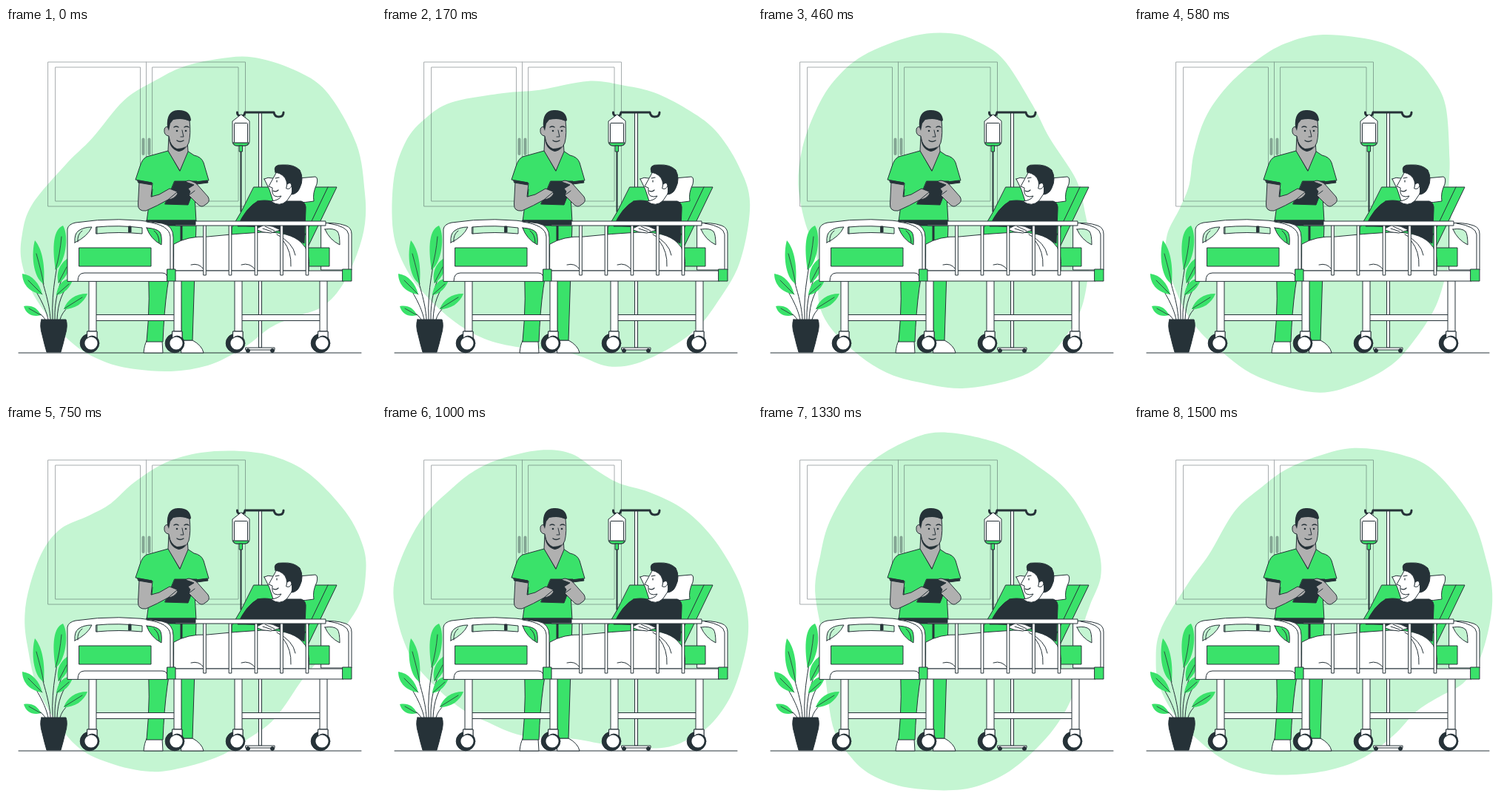
Recreate the animation shown at these times as an HTML page. Size 500x500 px, loop 1540 ms.

```html
<!DOCTYPE html>
<html lang="en">
<head>
<meta charset="utf-8">
<title>Hospital visit</title>
<style>
  html, body { margin: 0; width: 100%; height: 100%; overflow: hidden; background: #fff; }
  svg { display: block; width: 100vw; height: 100vh; }
  .scene { fill: none; stroke: #263238; stroke-width: 1; stroke-linecap: round; stroke-linejoin: round; }
  .green { fill: #3ae26a; }
  .white { fill: #fff; }
  .skin { fill: #b0b0b0; }
  .dark { fill: #263238; }
  .flat { stroke: none; }
  .cabinet { opacity: .4; }
  .leaf { fill: #3ae26a; stroke: none; }
</style>
</head>
<body>
<svg viewBox="0 0 500 500">
  <defs>
    <g id="leg">
      <path class="white" d="M-5 342V410H5V342ZM-7 410H6V422H-7Z"/>
      <circle class="dark" cx="-4" cy="426" r="12.800"/>
      <circle class="white flat" cx="-2" cy="426" r="8.600"/>
      <path class="white" d="M-7 410H6V419Q-1 413-7 419Z"/>
    </g>
    <path id="bar" class="white" d="M-1.800 267V334H1.800V267"/>
  </defs>

  <path id="blob" fill="#c4f5d2"/>

  <g class="scene">
    <g class="cabinet">
      <path d="M57 46H323.500V241H57ZM67 53H181.500V234H67ZM198 53H314V234H198ZM189.500 46V241"/>
      <path stroke-width="4" d="M185.500 150.500V170M193.500 150.500V170"/>
    </g>
    <path d="M17 439H480"/>

    <g id="plant">
      <path d="M60 394C59 370 50 348 41 312M63 394C61 350 70 325 75 282M66 394C65 368 72 345 82 323M57 394C54 380 47 365 30 339M69 394C70 372 76 355 87 345M73 394C76 381 91 370 103 364M53 394C48 386 40 381 31 379"/>
      <path class="leaf" d="M77 267C64 272 62 295 67 327C80 318 86 282 77 267ZM39 287C34 304 36 337 51 346C53 324 50 300 39 287ZM88 308C73 317 67 329 71 345C82 338 88 324 88 308ZM22 332C22 348 34 358 49 360C45 345 36 334 22 332ZM91 338C77 338 70 347 68 361C79 359 87 351 91 338ZM110 359C93 359 83 367 78 380C93 380 105 372 110 359ZM24 376C27 387 37 391 47 388C43 378 34 374 24 376Z"/>
      <path stroke-width=".8" d="M75 282Q73 306 67 326M41 305Q48 330 51 346M82 323L71 344M30 341L49 360M85 346L69 360M103 364L79 379M31 379L47 388"/>
      <path class="dark" d="M48 394H81Q84 402 80 415Q77 428 74 438H55Q52 428 49 415Q45 402 48 394Z"/>
    </g>

    <g id="drip">
      <path class="white" d="M341.500 114V432H345.500V114Z"/>
      <path stroke-width="3" d="M323 114H362Q363 120 368.500 120Q375 120 375 114M323 114Q322 120 317 119Q312 118 312.500 114"/>
      <path class="white" d="M317.500 117L306 126V153Q306 159 312 159H323Q329 159 329 153V126Z"/>
      <path class="green" d="M307 155H328Q327 159 323 159H312Q308 159 307 155Z"/>
      <rect class="white" x="308.500" y="128.500" width="18" height="26.500" rx="1"/>
      <path stroke-width="2" d="M317.500 167V248"/>
      <path class="green" d="M315.500 159H319.500V167H315.500Z"/>
      <path class="white" d="M324 432H363V435H324Z"/>
      <circle class="dark" cx="327" cy="436" r="2.500"/><circle class="dark" cx="360" cy="436" r="2.500"/>
    </g>

    <g id="nurse">
      <path class="white" d="M190 423H211L212 439H186Q187 428 190 423ZM237 422H252Q265 429 267 439H237Z"/>
      <path class="green" d="M191 266H257L252 422H237L236 290L230 295Q215 343 212 424H190Q196 365 191 310Z"/>
      <path class="green" d="M219 166L190 174Q184 177 181 187L175 205L197 209L190 262H257L254 209L274 206L267 182Q264 174 254 172L245 166L235 193Z"/>
      <path class="skin" d="M220 146L219 166L235 193L246 167L245 152Z"/>
      <path class="skin" d="M220 125Q233 119 248 125Q250 143 247 155Q243 165 234 166Q222 163 220 146Q213 145 214 137Q215 132 220 134Z"/>
      <path class="dark flat" d="M218 134Q216 112 232 111Q249 110 250 125L248 126Q239 121 226 124L222 129L220 139ZM220 147Q222 159 231 163Q238 163 243 160Q239 167 233 167Q220 163 220 147Z"/>
      <path stroke-width="1.400" d="M227 134Q230 132 233 134M241 134Q244 132 247 134M231 152Q235 155 240 152"/>
      <path d="M238 138L240 147H236"/>
      <circle class="dark flat" cx="231" cy="139" r="1.300"/><circle class="dark flat" cx="243" cy="139" r="1.300"/>
      <path class="dark" d="M228 207H258L246 239L215 238Z"/>
      <path class="skin" d="M180 208L178.500 238Q178 248 189 247Q205 240 219 232Q228 231 232 224L231 221L221 217L207 225L196 228L198 210ZM257 210L273 228Q277 235 269 239Q264 244 258 237L247 226L249 221L246 217L254 212L243 208Q246 204 253 208Z"/>
      <path d="M219 232L232 221M197 228L198 218M247 226L255 220"/>
      <path class="dark" d="M178 206L197 209V212L179 209ZM256 208L272 206 273 209 258 211Z"/>
      <path class="dark" d="M190 260H257V267H190Z"/>
      <path stroke-width="3" d="M237 267V292"/>
    </g>

    <g id="headboard">
      <path class="white" d="M426 264Q445 262 459 267Q467 270 467 278V327H426Z"/>
      <path d="M436 264Q462 268 463 279V326"/>
      <path fill="#c4f5d2" d="M431 272Q443 270 448 275Q451 279 451 293Q437 286 431 272Z"/>
      <path class="green" d="M405 297H437V322H405Z"/>
    </g>

    <g id="patient">
      <path class="green" d="M335 215H447L406 300H305V270L318 248Z"/>
      <path d="M435 215L401 286"/>
      <path class="white" d="M349 204Q354 201 360 203Q390 205 418 201Q422 202 420 211Q414 223 416 234Q394 238 361 234Q357 218 349 204Z"/>
      <path class="dark" d="M340 234Q350 232 358 234Q369 239 379 234L399 234Q406 236 405 246L403 291L377 278Q358 267 313 268Q324 243 340 234Z"/>
      <path class="white" d="M366 194Q361 203 355 214L360 216Q359 225 363 227Q367 229 372 227Q369 233 358 234Q370 243 380 233L386 224L391 212L384 196Z"/>
      <path class="dark" d="M364 195Q360 184 374 185Q389 184 397 192Q403 204 397 216Q394 224 386 225Q388 214 384 211L380 215L379 207Q376 197 364 195Z"/>
      <path class="white" d="M380 211Q385 207 386 213Q384 219 379 217Z"/>
      <path stroke-width="1.200" d="M364 203L369 202M361 220Q365 222 368 219M366 206V208"/>
      <path class="white" d="M227 292Q245 281 272 282Q310 278 346 276Q384 275 399 290Q412 301 409 328H227Z"/>
      <path class="white" d="M337 272L349 266Q361 267 371 273L358 277Q347 277 337 272Z"/>
      <path d="M347 271L359 275M350 268L363 274M250 320Q261 317 267 326M366 279Q388 290 391 307M375 288Q386 302 385 322M318 320Q330 316 338 328"/>
    </g>

    <g id="bed">
      <path class="white" d="M115 387.500H230V395.500H115ZM313 387.500H428V395.500H313Z"/>
      <use href="#leg" x="117"/><use href="#leg" x="232"/><use href="#leg" x="314"/><use href="#leg" x="429"/>
      <path class="white" d="M229 328H456V342H229Z"/>
      <path class="green" d="M455 326H467V342H455Z"/>
      <use href="#bar" x="268.500"/><use href="#bar" x="303"/><use href="#bar" x="338"/><use href="#bar" x="372.500"/><use href="#bar" x="407"/>
      <path class="white" d="M229 261H432V267H229Z"/>
      <path class="dark" d="M190 260H256V266H190Z"/>
      <path class="white" fill-rule="evenodd" d="M83 342V272Q84 265 94 263Q153 254 211 264Q226 267 226 283V327H218V342ZM93 290Q92 278 98 274Q105 269 116 269Q110 282 93 290ZM122 269Q153 266 184 270V278Q153 275 122 278ZM190 270Q204 271 208 276Q211 280 210 293Q195 285 190 270Z"/>
      <path d="M123 278V269M97 289Q96 279 103 274M207 290Q207 279 200 274M190 262Q221 266 222 282V326M97 342Q97 331 106 331H211Q218 331 218 338"/>
      <path class="dark" d="M166 268H169V276H166Z"/>
      <path class="green" d="M99 297H196V322H99ZM218 326H229V342H218Z"/>
    </g>
  </g>
</svg>
<script>
  const LOOP = 1540, START = -172.5;
  const outline = [
    [305, 31], [352, 36], [400, 57], [452, 106], [478, 152], [483, 191], [475, 233],
    [437, 293], [407, 332], [371, 389], [333, 421], [299, 444], [254, 461], [207, 470],
    [150, 461], [101, 437], [52, 373], [32, 310], [26, 268], [31, 226], [46, 179],
    [69, 148], [105, 129], [134, 111], [164, 81], [205, 52], [252, 36]
  ];
  const blob = document.getElementById("blob");

  // Closed Catmull-Rom spline as cubic Bezier segments.
  function smooth(points) {
    const at = i => points[(i + points.length) % points.length];
    const lean = (p, from, to) => p.map((v, k) => v + (to[k] - from[k]) / 6);
    return `M${points[0]}` + points.map((p, i) => {
      const next = at(i + 1);
      return `C${lean(p, at(i - 1), next)} ${lean(next, at(i + 2), p)} ${next}`;
    }).join("") + "Z";
  }

  function draw() {
    const angle = START + performance.now() % LOOP / LOOP * 360;
    blob.setAttribute("transform", `rotate(${angle} 255.4 250.5)`);
    requestAnimationFrame(draw);
  }
  blob.setAttribute("d", smooth(outline));
  draw();
</script>
</body>
</html>
```
